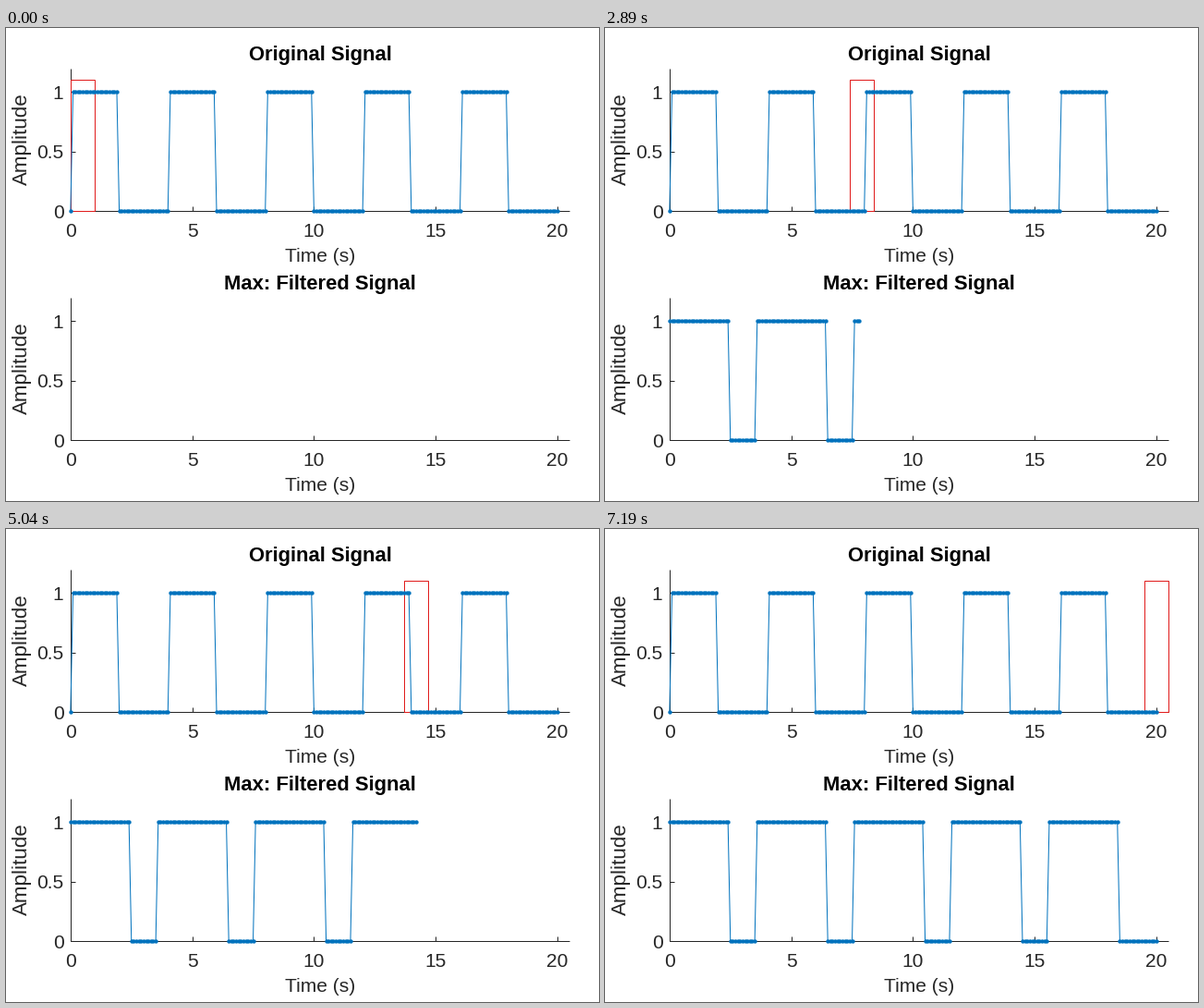
These frames come from a looping animation (642x512 px, 7.24 s). A matplotlib script:

```python
import numpy as np
import matplotlib.pyplot as plt
from matplotlib.animation import FuncAnimation
from matplotlib.patches import Rectangle

W, H, DPI = 642, 512, 100
PX = 72 / DPI                    # points per pixel
LOOP, STEP = 7240, 20            # ms
X0, SX, SY = 69.9, 26.35, 129    # pixel scales of both plots
TOP, BOTTOM = 198.3, 446.3       # baselines of the two plots
BLUE, RED, INK = "#0072bd", "#e01b1b", "#262626"

plt.rcParams["font.family"] = "Liberation Sans"
fig = plt.figure(figsize=(W / DPI, H / DPI), dpi=DPI, facecolor="white")
ax = fig.add_axes([0, 0, 1, 1])
ax.set(xlim=(0, W), ylim=(H, 0))
ax.axis("off")

idx = np.arange(201)
time = idx / 10
square = ((idx % 40 > 0) & (idx % 40 < 20)).astype(float)
filtered = np.array([square[max(0, i - 5):i + 6].max() for i in idx])


def px(t):
    return X0 + SX * t


def stroke(x, y):
    ax.plot(x, y, color=INK, lw=PX, zorder=1, solid_capstyle="butt")


def label(x, y, text, size, color=INK, **kw):
    ax.text(x, y, text, fontsize=size * PX, color=color,
            **{"ha": "center", "va": "baseline", **kw})


def draw_axes(base, title):
    right = px(20.5)
    stroke([X0, right], [base, base])
    stroke([X0, X0], [base, base - 1.2 * SY])
    for t in range(0, 21, 5):
        stroke([px(t)] * 2, [base, base - 5.5])
        label(px(t), base + 27.7, str(t), 21)
    for v in (0, 0.5, 1):
        y = base - v * SY
        stroke([X0, X0 + 5.5], [y, y])
        label(62.5, y + 7.5, f"{v:g}", 21, ha="right")
    mid = (X0 + right) / 2
    label(mid, base - 163.3, title, 22, "black", weight="bold")
    label(mid, base + 55, "Time (s)", 21)
    label(23, base - 78, "Amplitude", 22.4, rotation=90,
          rotation_mode="anchor")


def signal_line():
    return ax.plot([], [], color=BLUE, lw=PX, marker="o", ms=4.4 * PX,
                   mew=0, zorder=3)[0]


draw_axes(TOP, "Original Signal")
draw_axes(BOTTOM, "Max: Filtered Signal")
signal_line().set_data(px(time), TOP - SY * square)
output = signal_line()

window = Rectangle((X0, TOP - 1.1 * SY), SX, 1.1 * SY, fill=False,
                   ec=RED, lw=PX, zorder=2)
ax.add_patch(window)
window.set_clip_path(Rectangle((X0 - 1, 0), 20.5 * SX + 2, H,
                               transform=ax.transData))

# Progress in samples at a few ticks; the window leads the line by half a step.
TICKS = [1, 17, 37, 58, 88, 113, 144]
SAMPLES = [0, 21.5, 49, 78.5, 123, 159.5, 200]


def update(n):
    tick = 2 * (n + 1) // 5      # one tick lasts 50 ms, the first 40 ms
    if tick == 0:
        left, count = 0, 0
    else:
        pos = np.round(2 * np.interp(tick, TICKS, SAMPLES)) / 2
        left = np.ceil(pos) / 10 - 0.5
        count = int(pos) + 1
    window.set_x(px(left))
    output.set_data(px(time[:count]), BOTTOM - SY * filtered[:count])
    return window, output


anim = FuncAnimation(fig, update, frames=LOOP // STEP, interval=STEP,
                     repeat=True, repeat_delay=0, blit=False)
plt.show()
```
